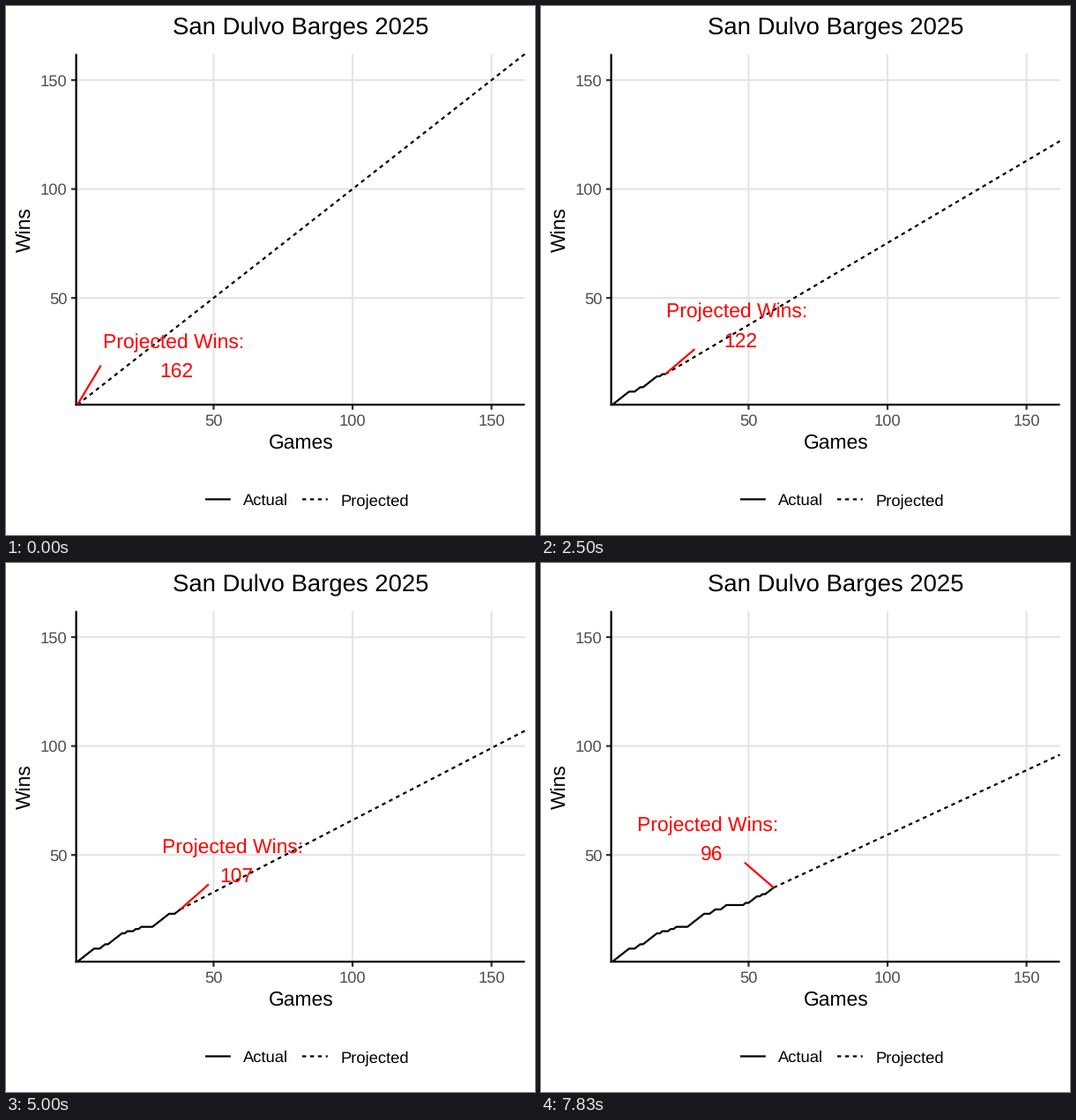
Write a matplotlib script that moves like this. It is 600 px wide and 600 px high and loops after 8000 ms.

```python
import math

import matplotlib.pyplot as plt
import numpy as np
from matplotlib.animation import FuncAnimation
from matplotlib.patches import Rectangle

plt.rcParams["font.family"] = "Liberation Sans"
plt.rcParams["text.hinting"] = "none"

LOOP = 8000
TICK = 25  # ms; finer than a step, so that steps change on time
STEPS = 48
SEASON = 162
GAMES_PER_STEP = 1.24
LOSSES = [8, 9, 12, 18, 20, 21, 23, *range(25, 29), 35, 36, 39, 40,
          *range(43, 49), 50, 54, 56]

# Panel edges in pixels; game 1 lies just inside the left edge
LEFT, RIGHT, TOP, BOTTOM = 79.6, 588.5, 54.4, 452.2
FIRST = 81
LW = 1.067
DASH = (0, (2, 2))
RED = "#FF0000"

games = np.arange(1, 61)
wins = np.cumsum(~np.isin(games, LOSSES))


def px(game):
    return FIRST + (game - 1) * (RIGHT - FIRST) / (SEASON - 1)


def py(win):
    return BOTTOM - (win - 1) * (BOTTOM - TOP) / (SEASON - 1)


fig = plt.figure(figsize=(4, 4), dpi=150, facecolor="white")
ax = fig.add_axes([0, 0, 1, 1])
ax.set_xlim(0, 600)
ax.set_ylim(600, 0)
ax.axis("off")
panel = Rectangle((LEFT, TOP), RIGHT - LEFT, BOTTOM - TOP,
                  transform=ax.transData)


def line(xs, ys, color="black", z=3, style="-", clip=False):
    item, = ax.plot(xs, ys, color=color, lw=LW, ls=style, zorder=z,
                    solid_capstyle="butt", dash_capstyle="butt",
                    solid_joinstyle="round", snap=False)
    if clip:
        item.set_clip_path(panel)
    return item


def label(x, y, s, size=11, color="black", ha="center", **kw):
    return ax.text(x, y, s, fontsize=size, color=color, ha=ha,
                   va="baseline", zorder=6, **kw)


# Grid, ticks and axes
for v in (50, 100, 150):
    x, y = px(v), py(v)
    line([x, x], [TOP, BOTTOM], "#E5E5E5", 1)
    line([LEFT, RIGHT], [y, y], "#E5E5E5", 1)
    line([x, x], [BOTTOM, BOTTOM + 5.7], "#333333")
    line([LEFT - 5.7, LEFT], [y, y], "#333333")
    label(x, 476, str(v), 8.8, "#4D4D4D")
    label(69.6, y + 6.6, str(v), 8.8, "#4D4D4D", "right")
line([LEFT, LEFT], [TOP, BOTTOM + 1], z=4)
line([LEFT - 1, RIGHT], [BOTTOM, BOTTOM], z=4)

label(334.3, 32, "San Dulvo Barges 2025", 13.2)
label(334.3, 502, "Games")
label(27.5, 253.3, "Wins", rotation=90, rotation_mode="anchor")

# Legend
line([226, 254.8], [559.5] * 2)
line([336, 364.8], [559.5] * 2, style=DASH)
label(269, 566, "Actual", 8.8, ha="left")
label(379, 566, "Projected", 8.8, ha="left")

actual = line([], [], clip=True)
projected = line([], [], style=DASH, clip=True)
pointer = line([], [], RED, 5)
caption = label(0, 0, "Projected Wins:", color=RED, ha="left")
count = label(0, 0, "", color=RED)


def caption_left(game):
    if game >= 39:
        return 109.3
    return np.interp(game, [1, 8, 20, 27, 33, 38],
                     [109.7, 124.5, 142.5, 152, 169, 177])


def pointer_end(x, y, left):
    if left - x > 10:
        return left - 2, y - 44.5
    offset = left + 83.4 - x
    return x + 34 * math.tanh(offset / 34), y - 28.5


def update(tick):
    step = (TICK * tick + TICK - 1) * STEPS // LOOP
    game = 1 + round(step * GAMES_PER_STEP)
    won = int(wins[game - 1])
    total = round(SEASON * won / game)
    x, y = px(game), py(won)

    actual.set_data(px(games[:game]), py(wins[:game]))
    projected.set_data([x, px(SEASON)], [y, py(total)])

    left = caption_left(game)
    end_x, end_y = pointer_end(x, y, left)
    pointer.set_data([x, end_x], [y, end_y])
    caption.set_position((left, y - 64))
    count.set_position((left + 84, y - 31))
    count.set_text(str(total))
    return actual, projected, pointer, caption, count


anim = FuncAnimation(fig, update, frames=LOOP // TICK, interval=TICK,
                     repeat=True, repeat_delay=0, blit=False)
plt.show()
```
